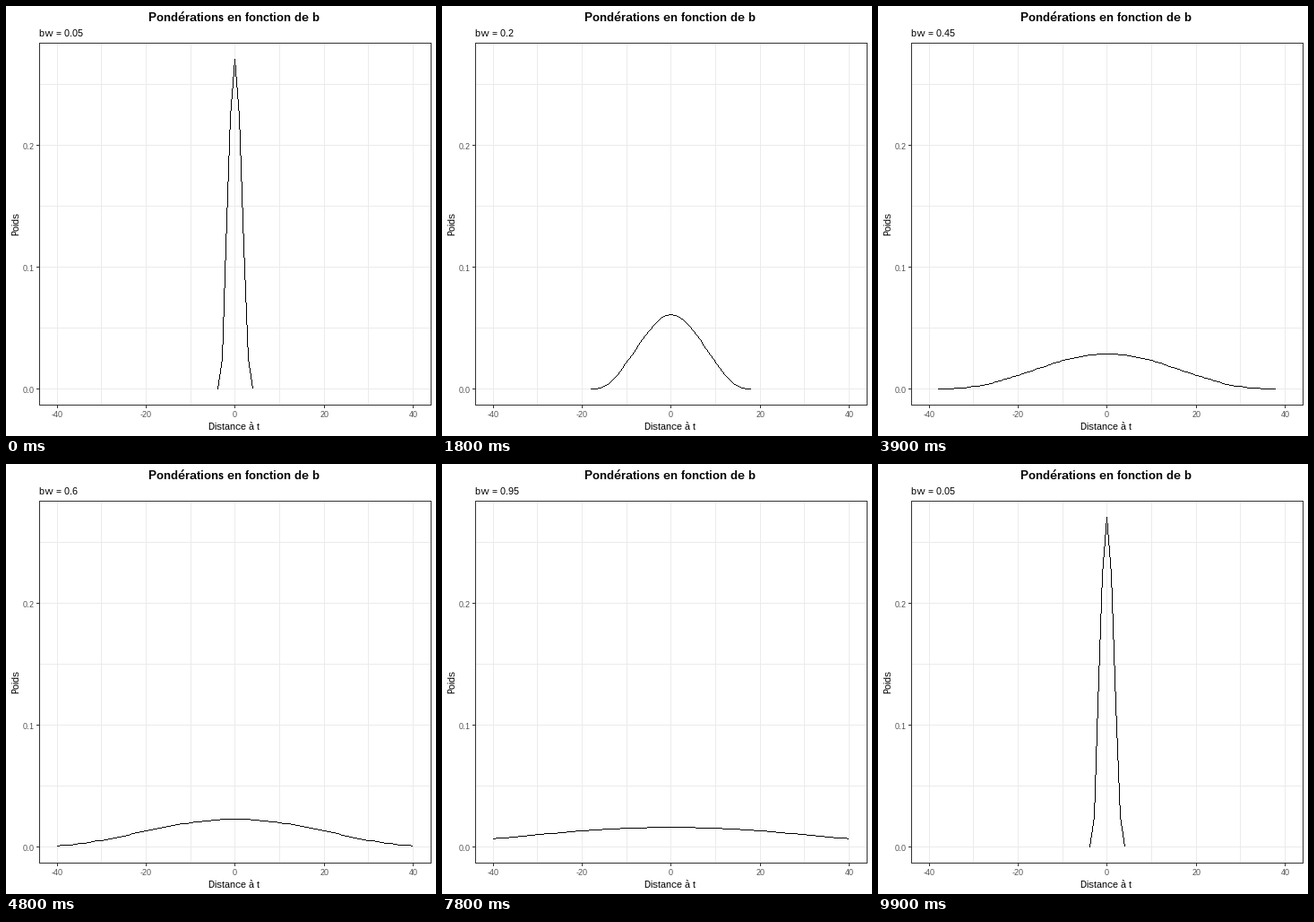
Write a matplotlib script that moves like this. It is 480 px wide and 480 px high and loops after 10000 ms.

```python
import numpy as np
import matplotlib.pyplot as plt
from matplotlib.animation import FuncAnimation
from matplotlib.collections import PolyCollection
from matplotlib.patches import Rectangle

plt.rcParams.update({
    "font.family": "Liberation Sans",
    "text.hinting": "native",
    "text.hinting_factor": 1,
    "toolbar": "None",
})

SIZE, DPI = 480, 80
HALF, COUNT = 40, 81
BANDWIDTHS = [k / 20 for k in range(1, 21)] + [2, 3, 4, 5]
# Frames halfway between one bandwidth and the next
MIDWAY = [*range(3, 24, 5), *range(27, 48, 4), *range(50, 99, 4)]
INK, GRID, TICK_TEXT = "#333333", "#EBEBEB", "#4D4D4D"
LEFT, RIGHT, TOP, BOTTOM = 37, 474, 41, 445

fig = plt.figure(figsize=(SIZE / DPI, SIZE / DPI), dpi=DPI, facecolor="white")
ax = fig.add_axes([0, 0, 1, 1])
ax.set(xlim=(0, SIZE), ylim=(SIZE, 0))
ax.axis("off")


def px(x):
    return np.floor(255.9 + 4.966 * np.asarray(x)).astype(int)


def py(y):
    return np.floor(427.35 - 1361 * np.asarray(y)).astype(int)


def box(x, y, w, h, color):
    ax.add_patch(Rectangle((x, y), w, h, facecolor=color, linewidth=0,
                           antialiased=False))


def label(x, y, text, size, color="black", **kw):
    kw = {"ha": "center", "va": "baseline", **kw}
    return ax.text(x, y, text, fontsize=size * 72 / DPI, color=color, **kw)


def weights(bw):
    """Normalised triweight kernel sampled at integer distances."""
    h = bw * COUNT
    reach = min(HALF, int(h))
    d = np.arange(-reach, reach + 1)
    w = (1 - (d / h) ** 2) ** 3
    return np.column_stack([d, w / w.sum()])


def refine(path, n):
    """Split the longest segments until the path has n points."""
    lengths = np.hypot(*np.diff(path, axis=0).T)
    parts = np.ones(len(lengths), int)
    while parts.sum() < n - 1:
        parts[np.argmax(np.round(lengths / parts, 9))] += 1
    pieces = [np.linspace(a, b, k, endpoint=False)
              for a, b, k in zip(path[:-1], path[1:], parts)]
    return np.vstack(pieces + [path[-1:]])


def halfway(a, b):
    n = max(len(a), len(b))
    return (refine(a, n) + refine(b, n)) / 2


def pixel_squares(path):
    """One-pixel line through the path, as unit squares."""
    points = np.column_stack([px(path[:, 0]), py(path[:, 1])])
    cells = []
    for a, b in zip(points[:-1], points[1:]):
        n = np.abs(b - a).max()
        if n:
            t = np.arange(n)[:, None] / n
            cells.append(np.floor(a + (b - a) * t + 0.5))
    corners = np.array([[0, 0], [1, 0], [1, 1], [0, 1]])
    return np.vstack(cells)[:, None, :] + corners


# Grid, border and ticks
for x in px(np.arange(-40, 41, 10)):
    box(x, TOP, 1, BOTTOM - TOP, GRID)
for y in py(np.arange(6) * 0.05):
    box(LEFT, y, RIGHT - LEFT, 1, GRID)

curve = PolyCollection([], facecolors="black", linewidths=0,
                       antialiaseds=False, zorder=2)
ax.add_collection(curve, autolim=False)

for y in (TOP, BOTTOM):
    box(LEFT, y, RIGHT - LEFT + 1, 1, INK)
for x in (LEFT, RIGHT):
    box(x, TOP, 1, BOTTOM - TOP + 1, INK)

for v in range(-40, 41, 20):
    x = px(v)
    box(x, BOTTOM + 1, 1, 3, INK)
    label(x + (0 if v < 0 else 0.5), 459, str(v), 9, TICK_TEXT)
for v in (0, 0.1, 0.2):
    y = py(v)
    box(LEFT - 3, y, 3, 1, INK)
    label(32, y + 5, f"{v:.1f}", 9, TICK_TEXT, ha="right")

label(254.5, 17, "Pondérations en fonction de b", 13, weight="bold")
label(255, 473, "Distance à t", 11)
label(11.5, 243.5, "Poids", 11, rotation=90, va="center")
caption = label(37, 34, "", 11, ha="left")

curves = [weights(bw) for bw in BANDWIDTHS]


def draw(frame):
    k = sum(m < frame for m in MIDWAY) % len(curves)
    path = curves[k]
    if frame in MIDWAY:
        path = halfway(path, curves[(k + 1) % len(curves)])
    curve.set_verts(pixel_squares(path))
    caption.set_text(f"bw = {BANDWIDTHS[k]:g}")
    return curve, caption


anim = FuncAnimation(fig, draw, frames=100, interval=100, repeat=True,
                     repeat_delay=0, blit=False)
plt.show()
```
